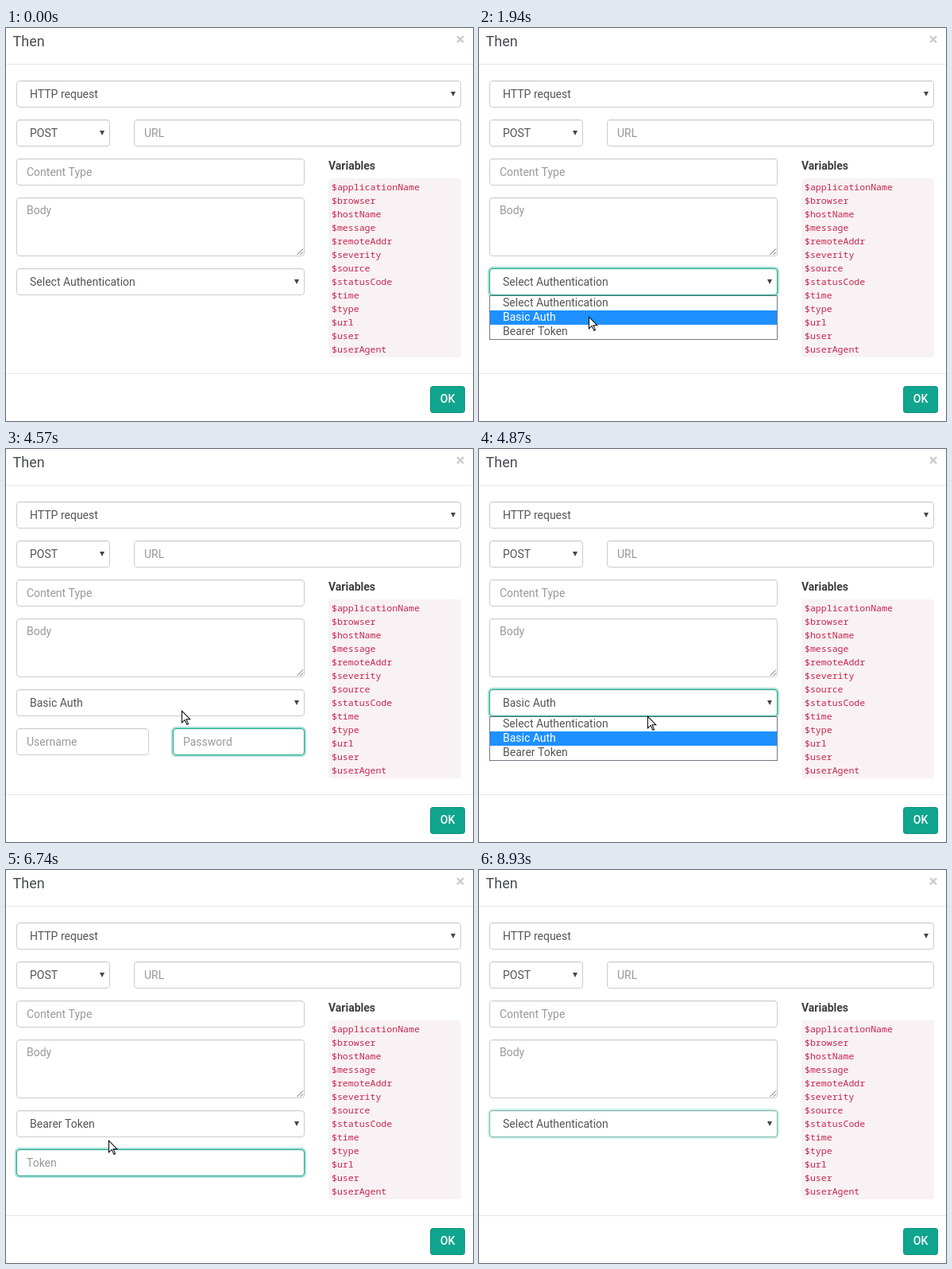
Recreate the animation shown at these times as an HTML page with a canvas. Size 588 px wide and 494 px high, loop 9 s.

```html
<!DOCTYPE html>
<html lang="en">
<head>
<meta charset="utf-8">
<title>Then</title>
<style>
html, body { margin: 0; width: 100%; height: 100%; overflow: hidden; background: #fff; }
canvas { display: block; }
</style>
</head>
<body>
<canvas id="stage" width="588" height="494"></canvas>
<script>
const ctx = document.getElementById('stage').getContext('2d');
const LOOP = 9000;
const SANS = 'Roboto, Arial, sans-serif';
const MONO = '"Noto Sans Mono", "DejaVu Sans Mono", monospace';
const INK = '#555', HINT = '#999', TEAL = '#1aa890';

const OPTIONS = ['Select Authentication', 'Basic Auth', 'Bearer Token'];
const VARIABLES = ['applicationName', 'browser', 'hostName', 'message', 'remoteAddr', 'severity',
  'source', 'statusCode', 'time', 'type', 'url', 'user', 'userAgent'];

// Bursts of screen updates: start, end, number of steps
const BURSTS = [[0, 0, 1], [530, 990, 7], [1160, 1940, 11], [2160, 2160, 1], [3340, 4180, 12],
  [4260, 5040, 11], [5420, 5420, 1], [5650, 5800, 3], [6120, 6350, 4], [6520, 6820, 5],
  [6990, 7370, 6], [7750, 7980, 4], [8930, 8930, 1]];

// Pointer path: time, x, y
const PATH = [[530, 310, 474], [990, 148, 328], [1400, 146, 329], [1940, 138, 362], [3260, 138, 362],
  [3340, 136.5, 360], [3480, 130, 366], [3560, 130, 366], [3950, 256, 368], [4180, 256, 368],
  [4572, 221, 328], [4650, 219, 326], [4730, 219, 326], [5040, 174, 386], [5580, 174, 386],
  [5800, 126, 360], [6440, 126, 360], [6820, 130, 328], [7140, 130, 328], [7370, 135, 345],
  [7670, 135, 345], [7903, 185, 425]];

const FOCUS = [[0, ''], [1110, 'auth'], [3450, 'user'], [3980, 'pass'], [4610, 'auth'],
  [6080, 'token'], [6950, 'auth'], [8855, '']];
const MODES = [[0, 0], [2160, 1], [5420, 2], [7750, 0]];
const OPEN = [[1230, 2160], [4720, 5420], [7130, 7750]];

const clamp = v => Math.max(0, Math.min(1, v));
const lastIndex = (list, t) => {
  let i = 0;
  while (i + 1 < list.length && list[i + 1][0] <= t) i++;
  return i;
};

function snap(t) {
  const [start, end, n] = BURSTS[lastIndex(BURSTS, t)];
  if (n === 1) return start;
  const step = (end - start) / (n - 1);
  return start + Math.min(n - 1, Math.floor((t - start) / step + 0.05)) * step;
}

function pointerAt(t) {
  const i = lastIndex(PATH, t);
  const a = PATH[i], b = PATH[i + 1] || a;
  const u = b === a ? 0 : clamp((t - a[0]) / (b[0] - a[0]));
  const e = u * u * (3 - 2 * u);
  return { x: Math.round(a[1] + (b[1] - a[1]) * e), y: Math.round(a[2] + (b[2] - a[2]) * e) };
}

function focusOf(name, t) {
  const i = lastIndex(FOCUS, t);
  const u = clamp((t - FOCUS[i][0]) / 150);
  if (FOCUS[i][1] === name) return u;
  return i && FOCUS[i - 1][1] === name ? 1 - u : 0;
}

function text(str, x, y, color = INK, font = '14px ' + SANS) {
  ctx.font = font;
  ctx.fillStyle = color;
  ctx.fillText(str, x, y);
}

function rect(x, y, w, h, color) {
  ctx.fillStyle = color;
  ctx.fillRect(x, y, w, h);
}

function round(x, y, w, h, r) {
  ctx.beginPath();
  ctx.roundRect(x, y, w, h, r);
}

function poly(points, color) {
  ctx.beginPath();
  points.forEach(([x, y]) => ctx.lineTo(x, y));
  ctx.closePath();
  ctx.fillStyle = color;
  ctx.fill();
}

function box(x, y, w, h, focus = 0) {
  if (focus) {
    ctx.globalAlpha = focus;
    round(x - 1, y - 1, w + 2, h + 2, 5);
    ctx.strokeStyle = 'rgba(26,168,144,.38)';
    ctx.lineWidth = 2;
    ctx.stroke();
    ctx.globalAlpha = 1;
  }
  round(x, y, w, h, 4);
  ctx.fillStyle = '#fff';
  ctx.fill();
  rect(x + 3, y + 1, w - 6, 1, 'rgba(0,0,0,.05)');
  round(x + 0.5, y + 0.5, w - 1, h - 1, 3.5);
  ctx.lineWidth = 1;
  ctx.strokeStyle = '#ccc';
  ctx.stroke();
  if (focus) {
    ctx.globalAlpha = focus;
    ctx.strokeStyle = TEAL;
    ctx.stroke();
    ctx.globalAlpha = 1;
  }
}

function input(x, y, w, hint, focus, h = 34) {
  box(x, y, w, h, focus);
  text(hint, x + 13, y + 22 - (h > 34 ? 1 : 0), HINT);
}

function select(x, y, w, label, focus) {
  box(x, y, w, 34, focus);
  text(label, x + 17, y + 22);
  const cx = x + w - 10, top = y + 14;
  poly([[cx - 3, top], [cx + 3, top], [cx, top + 6]], '#444');
}

function drawForm() {
  rect(0, 0, 588, 494, '#fff');
  text('Then', 8.5, 23, '#474c50', '18px ' + SANS);
  ctx.font = 'bold 21px ' + SANS;
  const m = ctx.measureText('×');
  text('×', 572 - m.width / 2, 14 + (m.actualBoundingBoxAscent - m.actualBoundingBoxDescent) / 2,
    '#ccc', 'bold 21px ' + SANS);
  rect(0, 45, 588, 1, '#e5e5e5');
  rect(0, 434, 588, 1, '#e5e5e5');

  select(13, 66, 560, 'HTTP request');
  select(13, 115, 118, 'POST');
  input(161, 115, 412, 'URL');
  input(13, 164, 363, 'Content Type');
  input(13, 213, 363, 'Body', 0, 74);

  ctx.beginPath();
  ctx.moveTo(366.5, 285); ctx.lineTo(374, 277.5);
  ctx.moveTo(370.5, 285); ctx.lineTo(374, 281.5);
  ctx.strokeStyle = '#666';
  ctx.lineWidth = 1;
  ctx.stroke();

  text('Variables', 406, 178, '#3d3d3d', 'bold 14px ' + SANS);
  round(406, 189, 167, 225, 4);
  ctx.fillStyle = '#f8f2f4';
  ctx.fill();
  VARIABLES.forEach((v, i) => text('$' + v, 410, 204 + i * 17, '#c7254e', '11.55px ' + MONO));

  round(534, 450, 44, 34, 4);
  ctx.fillStyle = '#0e957f';
  ctx.fill();
  round(535, 451, 42, 32, 3);
  ctx.fillStyle = '#10a58e';
  ctx.fill();
  ctx.textAlign = 'center';
  text('OK', 556, 471, '#fff', '500 14px ' + SANS);
  ctx.textAlign = 'left';
}

function drawList(row) {
  rect(13, 336, 363, 56, '#6f7b87');
  rect(14, 337, 361, 54, '#fff');
  rect(14, 337 + row * 18, 361, 18, '#1e90ff');
  OPTIONS.forEach((o, i) => text(o, 30, 350 + i * 18, i === row ? '#fff' : INK));
}

function drawArrow(x, y) {
  const shape = [[0, 0], [0, 17], [4, 13.3], [6.6, 19], [9.2, 18], [6.8, 12.2], [12, 12.2]];
  const core = [[1, 2.4], [1, 14.8], [4.3, 11.7], [7.1, 17.7], [7.9, 17.3], [5.3, 11.2], [9.7, 11.2]];
  const at = pts => pts.map(([a, b]) => [x + a, y + b]);
  poly(at(shape), '#000');
  poly(at(core), '#fff');
}

function drawBeam(x, y) {
  rect(x - 1, y - 7, 2, 14, '#111');
  for (const edge of [-8, 7]) {
    rect(x - 4, y + edge, 3, 1, '#111');
    rect(x + 1, y + edge, 3, 1, '#111');
  }
}

function draw(now) {
  const t = snap(now % LOOP);
  const mode = MODES[lastIndex(MODES, t)][1];
  const open = OPEN.some(([a, b]) => t >= a && t < b);
  const p = pointerAt(t);

  drawForm();
  select(13, 302, 363, OPTIONS[mode], focusOf('auth', t));
  if (mode === 1) {
    input(13, 351, 167, 'Username', focusOf('user', t));
    input(210, 351, 166, 'Password', focusOf('pass', t));
  } else if (mode === 2) {
    input(13, 351, 363, 'Token', focusOf('token', t));
  }
  if (open) drawList(p.y < 337 ? mode : Math.min(2, Math.floor((p.y - 337) / 18)));

  if (t >= 530 && t < 7975) {
    const gap = mode === 1 && p.x > 180 && p.x < 210;
    const overInput = !open && mode && !gap && p.y >= 351 && p.y <= 387;
    (overInput ? drawBeam : drawArrow)(p.x, p.y);
  }
}

const began = performance.now();
function tick() {
  draw(performance.now() - began);
  requestAnimationFrame(tick);
}
tick();
</script>
</body>
</html>
```
